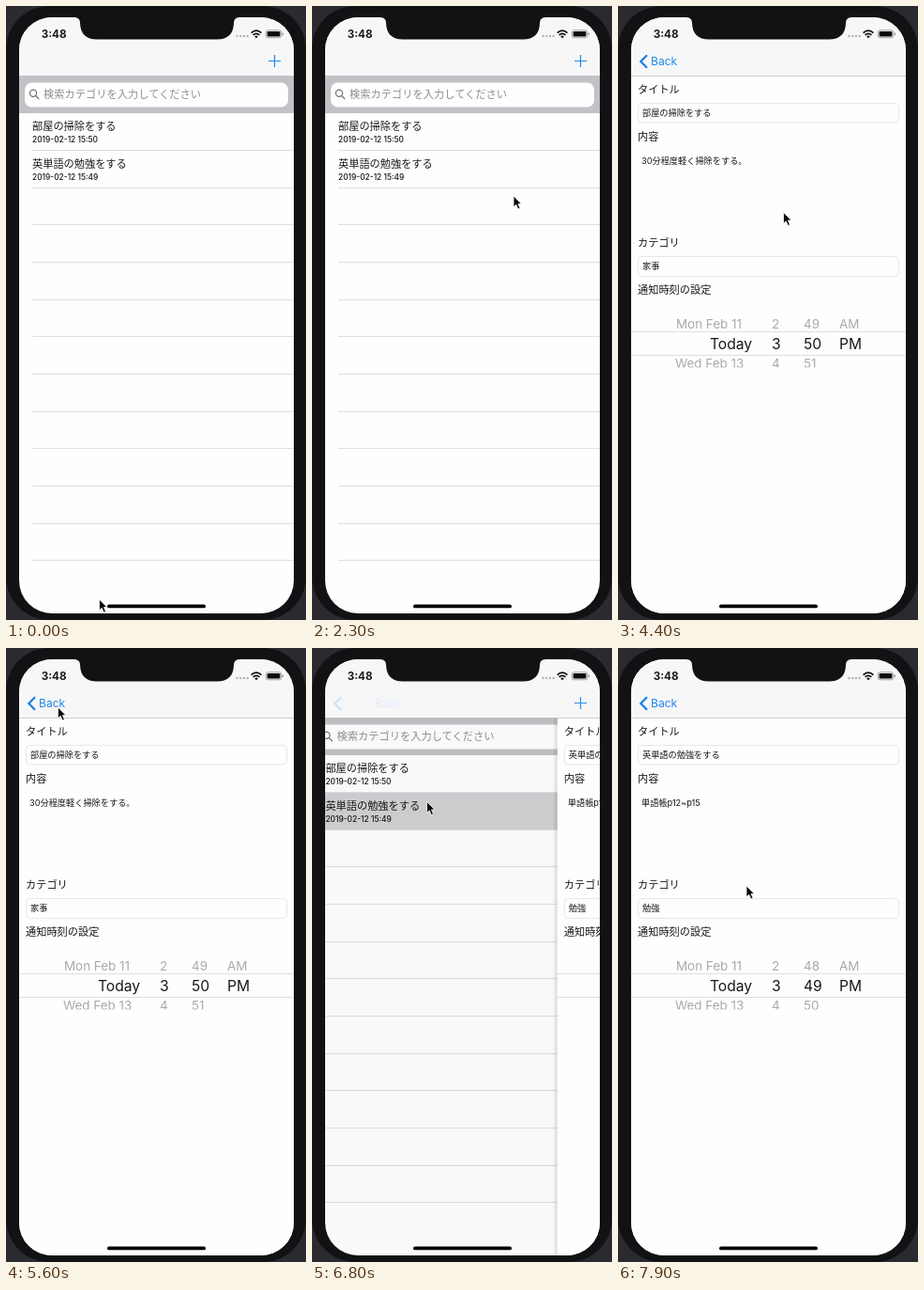
Animation of 320x653 px, one loop 8 s. Source, as an HTML page:

```html
<!DOCTYPE html>
<html lang="ja">
<head>
<meta charset="utf-8">
<title>Task list</title>
<style>
  html, body { margin: 0; width: 100%; height: 100%; overflow: hidden; background: #121215; }
  svg { display: block; width: 320px; height: 653px; }
  text { font-family: Inter, "Noto Sans CJK JP", "Noto Sans CJK", sans-serif; fill: #18181a; white-space: pre; }
  .blue { fill: #2387e6; }
  .line { stroke: #dedee8; stroke-width: 1; }
  .field { fill: #fefefe; stroke: #e6e6ee; stroke-width: 1; }
</style>
</head>
<body>
<svg viewBox="0 0 320 653">
  <defs>
    <clipPath id="screen"><rect x="14" y="12" width="293" height="634" rx="35"/></clipPath>
    <clipPath id="wheel"><rect x="14" y="328" width="293" height="56.5"/></clipPath>
    <linearGradient id="edge">
      <stop offset="0" stop-color="#000" stop-opacity="0"/>
      <stop offset="1" stop-color="#000" stop-opacity=".13"/>
    </linearGradient>
  </defs>
  <rect width="320" height="653" fill="#2a2a30"/>
  <rect width="320" height="653" rx="46" fill="#121215"/>

  <g clip-path="url(#screen)">
    <rect x="14" y="12" width="293" height="634" fill="#fefefe"/>
    <g id="list">
      <rect x="14" y="74" width="293" height="40" fill="#c2c2c6"/>
      <rect x="20" y="81.5" width="281" height="26" rx="7.5" fill="#fefefe"/>
      <g fill="none" stroke="#707074" stroke-width="1.2" stroke-linecap="round">
        <circle cx="29" cy="92.8" r="3.6"/><path d="M31.7 95.5L35 98.8"/>
      </g>
    </g>
    <rect id="dim" x="14" y="74" width="293" height="572" fill="#000"/>
    <g id="detail">
      <rect x="9" y="74" width="5" height="572" fill="url(#edge)"/>
      <rect x="14" y="74" width="293" height="572" fill="#fefefe"/>
      <rect class="field" x="21.5" y="103.5" width="278" height="20.5" rx="4"/>
      <rect class="field" x="21.5" y="266.5" width="278" height="21" rx="4"/>
      <path class="line" d="M14 346.5H307M14 371.5H307"/>
      <g id="picker" clip-path="url(#wheel)"/>
    </g>

    <rect x="14" y="12" width="293" height="62" fill="#f7f7f8"/>
    <rect x="14" y="74" width="293" height=".8" fill="#c4c4c8"/>
    <path id="plus" d="M286.5 52V65M280 58.5H293" stroke="#2387e6" stroke-width="1.2"/>
    <path id="chevron" d="M31 52.3L24.3 59L31 65.7" fill="none" stroke="#1a80e6" stroke-width="2.2"/>
    <g id="back"/>

    <g id="status">
      <g fill="#b2b2b6"><circle cx="246.5" cy="32" r="1.2"/><circle cx="250.2" cy="32" r="1.2"/><circle cx="253.9" cy="32" r="1.2"/><circle cx="257.6" cy="32" r="1.2"/></g>
      <g fill="none" stroke="#0c0c0e" stroke-width="1.7">
        <path d="M261.6 28.6Q267 23.6 272.4 28.6M263.6 30.9Q267 27.7 270.4 30.9"/>
      </g>
      <path d="M265.2 32.4Q267 30.8 268.8 32.4L267 34.3Z" fill="#0c0c0e"/>
      <rect x="277.3" y="25.8" width="16.4" height="8" rx="2.2" fill="none" stroke="#8c8c90" stroke-width=".8"/>
      <rect x="278.6" y="27.1" width="13.8" height="5.4" rx="1.2" fill="#0c0c0e"/>
      <rect x="294.7" y="28.4" width="1.2" height="2.8" rx=".6" fill="#8c8c90"/>
    </g>
    <rect x="108" y="636.5" width="105" height="3.8" rx="1.9" fill="#040405"/>
  </g>

  <path d="M73 11V12Q79 12.4 79 18Q79.5 35.5 97 35.5H225Q242.5 35.5 243 18Q243 12.4 249 12V11Z" fill="#121215"/>
  <path id="cursor" d="M0 0V11.8L2.7 9.3L4.8 14L6.9 13L4.9 8.5H8.4Z" fill="#050506" stroke="#fafafa" stroke-width=".8"/>
</svg>

<script>
const NS = 'http://www.w3.org/2000/svg';
const LOOP = 8000, STEP = 100, WIDTH = 293, ROW = 39.65;
const $ = id => document.getElementById(id);

function add(parent, tag, attrs) {
  const el = document.createElementNS(NS, tag);
  for (const key in attrs) el.setAttribute(key, attrs[key]);
  parent.appendChild(el);
  return el;
}

function label(parent, x, y, size, str = '', attrs = {}) {
  const el = add(parent, 'text', { x, y, 'font-size': size, ...attrs });
  el.textContent = str;
  return el;
}

const tasks = [
  { title: '部屋の掃除をする', date: '2019-02-12 15:50', body: '30分程度軽く掃除をする。', tag: '家事', minute: 50 },
  { title: '英単語の勉強をする', date: '2019-02-12 15:49', body: '単語帳p12~p15', tag: '勉強', minute: 49 }
];

// List page
const list = $('list');
label(list, 40, 97.6, 11.25, '検索カテゴリを入力してください', { style: 'fill:#8e8e93' });
const marks = tasks.map((task, i) => {
  const y = 114 + ROW * i;
  const mark = add(list, 'rect', { x: 14, y, width: WIDTH, height: ROW, fill: '#d0d0d2' });
  label(list, 28, y + 18.3, 11.2, task.title);
  label(list, 28, y + 31, 8.4, task.date, { 'font-weight': 500 });
  return mark;
});
for (let i = 1; i <= 12; i++) {
  const y = Math.floor(114 + ROW * i) + 0.5;
  add(list, 'path', { class: 'line', d: `M28 ${y}H307` });
}

// Detail page
const detail = $('detail'), picker = $('picker');
[['タイトル', 92.6], ['内容', 142.8], ['カテゴリ', 256], ['通知時刻の設定', 306]]
  .forEach(([str, y]) => label(detail, 21, y, 11.2, str));
const title = label(detail, 26, 117, 9.2);
const body = label(detail, 25, 168, 9.2);
const tag = label(detail, 26, 280.4, 9.2);

const wheelRows = [
  [343, 13.4, '#a9a9ac', 62, 'Mon Feb 11', '2', 'AM'],
  [364.8, 15.6, '#18181a', 98, 'Today', '3', 'PM'],
  [385.4, 13.4, '#a9a9ac', 61, 'Wed Feb 13', '4', '']
];
const minutes = wheelRows.map(([y, size, color, x, day, hour, half]) => {
  const put = (px, str) => label(picker, px, y, size, str, { style: `fill:${color}` });
  put(x, day);
  put(164, hour);
  put(236, half);
  return put(198, '');
});

label($('back'), 35, 63.2, 12.1, 'Back', { class: 'blue' });
label($('status'), 37.7, 34, 11.6, '3:48', { 'font-weight': 650 });

// Pointer stops: time, x, y
const stops = [
  [0, 99.5, 631], [700, 140, 470], [900, 140, 470], [1700, 218, 258], [1900, 218, 258],
  [2300, 215, 202], [2700, 215, 202], [3300, 199, 135], [3600, 197.5, 142],
  [4400, 176.5, 219.5], [4900, 176.5, 219.5], [5700, 50, 56], [6000, 50, 56],
  [6600, 122.5, 163.5], [6800, 122.5, 163.5], [7500, 147, 362], [7600, 147, 362], [7900, 137, 253], [8000, 137, 253]
];

function pointer(t) {
  const i = Math.max(1, stops.findIndex(s => s[0] > t));
  const [t0, x0, y0] = stops[i - 1], [t1, x1, y1] = stops[i];
  const k = (t - t0) / (t1 - t0), e = k * k * (3 - 2 * k);
  return [x0 + (x1 - x0) * e, y0 + (y1 - y0) * e];
}

// Critically damped spring, settled after 750 ms
function spring(ms) {
  if (ms <= 0) return 0;
  if (ms >= 750) return 1;
  const w = ms * 0.012;
  return 1 - Math.exp(-w) * (1 + w);
}

const PUSH = 3400, POP = 5792, PUSH2 = 6742;

function fill(task) {
  title.textContent = task.title;
  body.textContent = task.body;
  tag.textContent = task.tag;
  minutes.forEach((el, i) => el.textContent = task.minute + i - 1);
}

let shown = null;
function draw(t) {
  const second = t >= 6700;
  const p = second ? spring(t - PUSH2) : spring(t - PUSH) - spring(t - POP);
  const task = tasks[second ? 1 : 0];
  if (task !== shown) fill(shown = task);

  list.setAttribute('transform', `translate(${-88 * p} 0)`);
  detail.setAttribute('transform', `translate(${WIDTH * (1 - p)} 0)`);
  detail.setAttribute('visibility', p > 0 ? 'visible' : 'hidden');
  $('dim').setAttribute('opacity', 0.115 * p);
  marks[0].setAttribute('opacity', t >= PUSH && t < POP ? 1 : 0);
  marks[1].setAttribute('opacity', second ? 1 : 0);

  $('plus').setAttribute('opacity', 1 - p ** 1.5);
  $('chevron').setAttribute('opacity', Math.min(1, p * 1.2));
  $('back').setAttribute('opacity', p ** 1.2);
  $('back').setAttribute('transform', `translate(${38 * (1 - p)} 0)`);
  $('cursor').setAttribute('transform', `translate(${pointer(t)})`);
}

const start = performance.now();
function tick() {
  const t = (performance.now() - start) % LOOP;
  draw(Math.floor(t / STEP) * STEP);
  requestAnimationFrame(tick);
}
tick();
</script>
</body>
</html>
```
